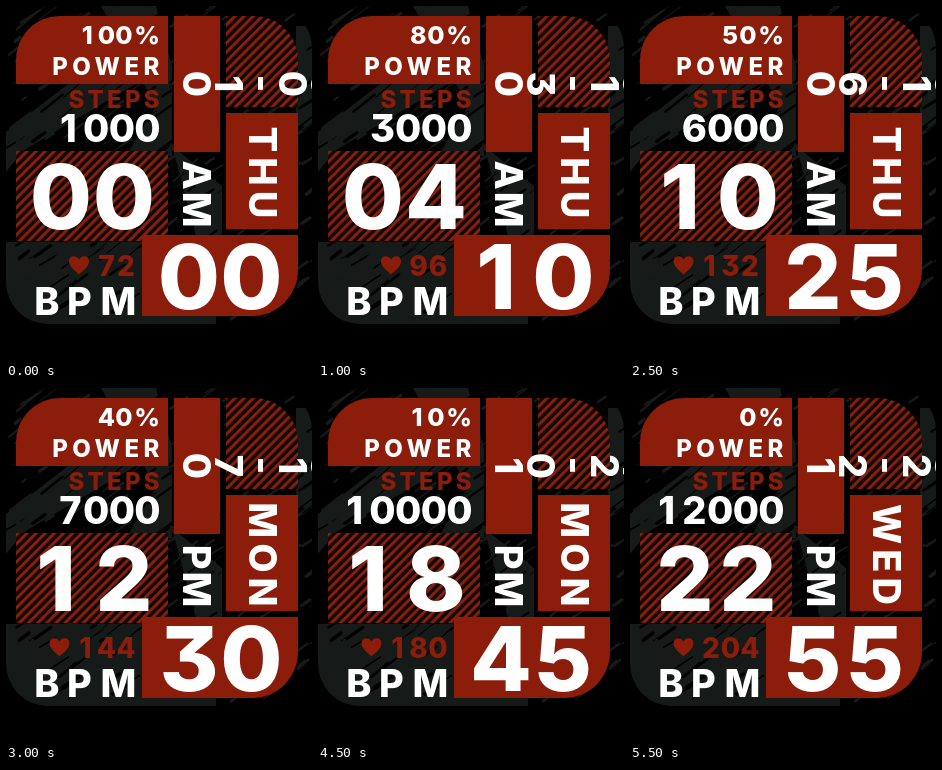
Recreate the animation shown at these times as an HTML page. Size 306x354 px, loop 6000 ms.

```html
<!DOCTYPE html>
<html lang="en">
<head>
<meta charset="utf-8">
<title>Watch face</title>
<style>
html, body { margin: 0; width: 100%; height: 100%; overflow: hidden; background: #000; }
svg { display: block; width: 306px; height: 354px; }
text { font-family: Inter, Roboto, sans-serif; font-weight: 800; font-feature-settings: "cv09"; fill: #fff; }
.red { fill: #8c1d0a; }
.digits, .mid { text-anchor: middle; }
.label { font-size: 24px; text-anchor: end; }
</style>
</head>
<body>
<svg viewBox="0 0 306 354">
  <defs>
    <pattern id="hatch" width="6.45" height="6.45" patternUnits="userSpaceOnUse" patternTransform="rotate(45)">
      <rect width="6.45" height="6.45" fill="#0d0907"/>
      <rect width="3" height="6.45" class="red"/>
    </pattern>
    <clipPath id="face"><rect width="306" height="318" rx="42"/></clipPath>
  </defs>
  <rect width="306" height="354"/>
  <g id="grunge" clip-path="url(#face)" stroke-linecap="round"></g>

  <path class="red" d="M10 78V54A44 44 0 0 1 54 10H162V78Z"/>
  <path class="red" d="M168 10h46v136h-46z"/>
  <path fill="url(#hatch)" d="M220 10H248A44 44 0 0 1 292 54V101H220Z"/>
  <path class="red" d="M220 107h72v116h-72z"/>
  <path fill="url(#hatch)" d="M10 145h152v90h-152z"/>
  <path class="red" d="M136 229H292V264A46 46 0 0 1 246 310H136Z"/>

  <text class="label" x="158" y="69" letter-spacing="4.5">POWER</text>
  <text class="label red" x="157" y="101.500" letter-spacing="3.3">STEPS</text>
  <text class="mid" x="41 73.500 112.500" y="309" font-size="38">BPM</text>
  <path id="heart" class="red" d="M0 9C-4 5-10 1-10-4C-10-10-3-11 0-6C3-11 10-10 10-4C10 1 4 5 0 9Z"/>

  <text id="power" class="digits" y="38" font-size="25"></text>
  <text id="steps" class="digits" y="136" font-size="38"></text>
  <text id="hour" class="digits" y="222.500" font-size="90"></text>
  <text id="minute" class="digits" y="302.500" font-size="90"></text>
  <text id="bpm" class="digits red" y="269.500" font-size="28"></text>
  <text id="half" class="mid" transform="translate(177 189) rotate(90)" font-size="38" letter-spacing="2"></text>
  <text id="day" class="mid" transform="translate(242.500 169) rotate(90)" font-size="38" letter-spacing="5"></text>
  <g id="date" class="mid" font-size="38"></g>
</svg>
<script>
const NS = 'http://www.w3.org/2000/svg';
const STEP = 500, COUNT = 12;
const $ = id => document.getElementById(id);
const pad = n => String(n).padStart(2, '0');

function add(parent, tag, attrs) {
  const el = document.createElementNS(NS, tag);
  for (const key in attrs) el.setAttribute(key, attrs[key]);
  return parent.appendChild(el);
}

// Dark brushed texture behind the panels
let seed = 11;
const rand = () => (seed = (seed * 16807) % 2147483647) / 2147483647;
const grey = '#161a18';
add($('grunge'), 'path', {
  d: 'M0 126L62 78H130L18 144L0 166ZM95 0H150L166 60V150H120L150 100ZM0 236H140V318H0ZM140 306H210V318H140ZM166 140L216 180V230H190ZM290 20H306V110L290 122Z',
  fill: grey
});
for (let i = 0; i < 420; i++) {
  const x = rand() * 306, y = rand() * 318, len = 3 + rand() * 20;
  add($('grunge'), 'path', {
    d: `M${x} ${y}l${len} ${-len * (0.6 + rand() * 0.3)}`,
    stroke: rand() < 0.5 ? grey : '#000',
    'stroke-width': 0.6 + rand() * 3
  });
}

// Digits sit in equal cells counted back from the last one; a 1 hugs the left
function setDigits(id, value, last, pitch, suffix = '') {
  const str = String(value), el = $(id);
  const size = +el.getAttribute('font-size');
  const xs = [...str].map((c, i) =>
    last - (str.length - 1 - i) * pitch - (c === '1' ? size * 0.055 : 0));
  if (suffix) xs.push(141);
  el.setAttribute('x', xs.join(' '));
  el.textContent = str + suffix;
}

const dateCells = [[177, 78], [209, 78], [242.5, 77.5], [273, 78], [304.5, 78]].map(([x, y]) =>
  add($('date'), 'text', { transform: `translate(${x} ${y}) rotate(90)` }));

function draw(k) {
  const date = new Date(Date.UTC(2022, k, 6 + 2 * k));
  const bpm = 72 + 12 * k;
  setDigits('power', Math.max(0, 100 - 10 * k), 118, 17.7, '%');
  setDigits('steps', 1000 * (k + 1), 141.5, 25.7);
  setDigits('hour', pad(2 * k), 118, 63);
  setDigits('minute', pad(5 * k), 245.5, 62.5);
  setDigits('bpm', bpm, 120, 19.5);
  $('heart').setAttribute('transform', `translate(${bpm < 100 ? 73 : 53.5} 259.5)`);
  $('half').textContent = k < 6 ? 'AM' : 'PM';
  $('day').textContent = date.toUTCString().slice(0, 3).toUpperCase();
  const str = pad(k + 1) + '-' + pad(date.getUTCDate());
  dateCells.forEach((cell, i) => { cell.textContent = str[i]; });
}

const start = performance.now();
let shown = -1;
function tick() {
  const k = Math.floor((performance.now() - start) / STEP) % COUNT;
  if (k !== shown) draw(shown = k);
  requestAnimationFrame(tick);
}
tick();
</script>
</body>
</html>
```
